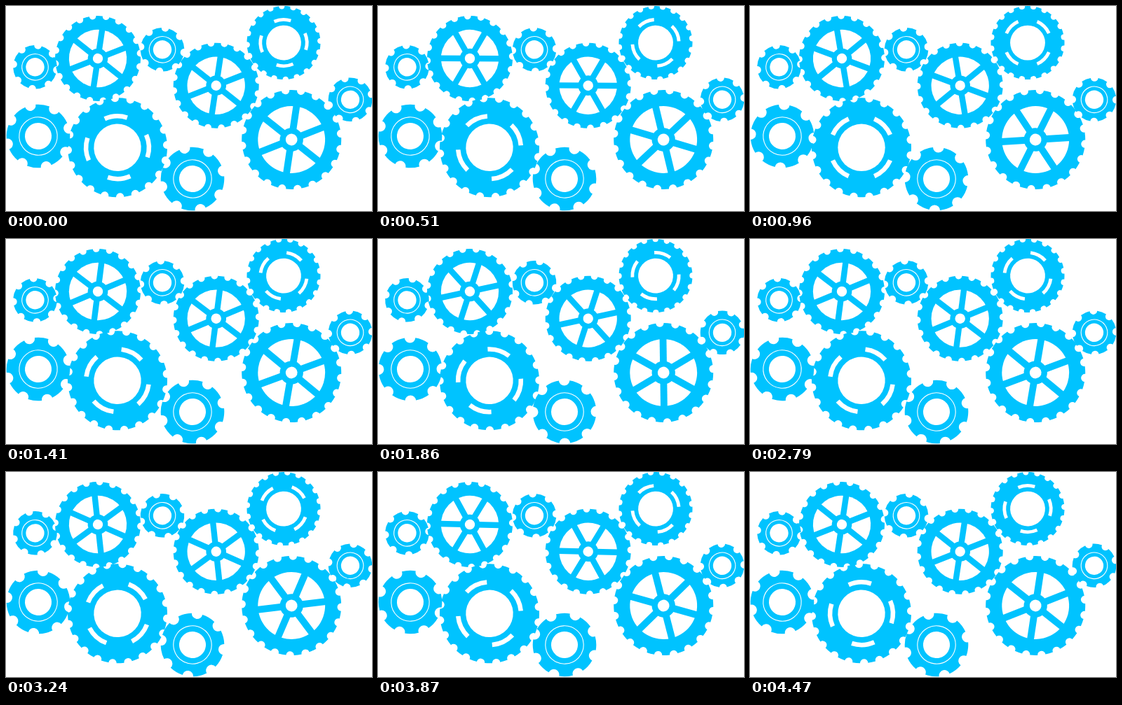
Write an HTML page that moves like this. It is 522 px wide and 293 px high and loops after 4.5 s.

```html
<!DOCTYPE html>
<html lang="en">
<head>
<meta charset="utf-8">
<title>Gears</title>
<style>
  html, body { margin: 0; width: 100%; height: 100%; overflow: hidden; background: #fff; }
  svg { display: block; width: 100vw; height: 100vh; }
</style>
</head>
<body>
<svg id="stage" viewBox="0 0 522 293"></svg>
<script>
const BLUE = '#00c3ff', WHITE = '#fff';
const LOOP = 4500, STEPS = 110, SWING = 70.6, TURN = 49.5;
const stage = document.getElementById('stage');

// kind, centre x, centre y, radius, turning ratio, angle at rest
const gears = [
  ['cog', 41.5, 87.3, 31.3, -2.5, 30],
  ['spoke', 131, 75, 61, 1, 8.5],
  ['cog', 223, 62.3, 31.3, -2.5, 30],
  ['spoke', 299.7, 113.7, 61, 1, 8.5],
  ['slot', 396, 52.6, 52.5, -1, -3],
  ['spoke', 407.2, 191, 71, -1, 8.5],
  ['cog', 491, 133.8, 31.3, 2.5, 8],
  ['cog', 46, 186, 45.3, 1.5, 8],
  ['slot', 159, 202.3, 71, -1, -3],
  ['cog', 266, 247, 45.3, 1.5, 8]
];

const point = (r, deg) => {
  const a = (deg - 90) * Math.PI / 180;
  return (r * Math.cos(a)).toFixed(2) + ' ' + (r * Math.sin(a)).toFixed(2);
};

const disc = (r, fill) => `<circle r="${r}" fill="${fill}"/>`;

// Disc with round bites centred on its rim; the first tooth is at `phase`.
function rim(r, teeth, bite, phase) {
  const pitch = 360 / teeth;
  const half = 2 * Math.asin(bite / 2 / r) * 180 / Math.PI;
  let d = '';
  for (let i = 0; i < teeth; i++) {
    const gap = phase + (i + 0.5) * pitch;
    d += (i ? 'L' : 'M') + point(r, gap - pitch + half)
      + `A${r} ${r} 0 0 1 ${point(r, gap - half)}`
      + `A${bite} ${bite} 0 0 0 ${point(r, gap + half)}`;
  }
  return `<path d="${d}Z" fill="${BLUE}"/>`;
}

const kinds = {
  cog: r => rim(r, 8, r * 0.172, 0)
    + `<circle r="${r * 0.6}" fill="none" stroke="${WHITE}" stroke-width="1.1"/>`
    + disc(r * 0.42, WHITE),

  spoke(r) {
    const reach = r * 0.69;
    let out = rim(r, 20, r * 0.08, -6.5) + disc(r * 0.675, WHITE);
    for (let i = 0; i < 3; i++) {
      out += `<path d="M${point(reach, i * 60)}L${point(reach, i * 60 + 180)}"`
        + ` stroke="${BLUE}" stroke-width="${r * 0.138}"/>`;
    }
    return out + disc(r * 0.235, BLUE) + disc(r * 0.118, WHITE);
  },

  slot(r) {
    const mid = r * 0.632;
    let out = rim(r, 20, r * 0.08, 9) + disc(r * 0.475, WHITE);
    for (let i = 0; i < 4; i++) {
      out += `<path d="M${point(mid, i * 90 - 21)}A${mid} ${mid} 0 0 1 ${point(mid, i * 90 + 21)}"`
        + ` fill="none" stroke="${WHITE}" stroke-width="${r * 0.092}"/>`;
    }
    return out;
  }
};

stage.innerHTML = gears.map(([kind, x, y, r]) =>
  `<g transform="translate(${x} ${y})"><g class="wheel">${kinds[kind](r)}</g></g>`).join('');
const wheels = [...stage.querySelectorAll('.wheel')];

const bezier = (a, b, s) => 3 * (1 - s) * (1 - s) * s * a + 3 * (1 - s) * s * s * b + s * s * s;

// Steady start, soft stop.
function ease(x) {
  let lo = 0, hi = 1;
  for (let i = 0; i < 24; i++) {
    const mid = (lo + hi) / 2;
    if (bezier(0.167, 0.667, mid) < x) lo = mid; else hi = mid;
  }
  return bezier(0.167, 1, lo);
}

function draw(time) {
  const step = Math.floor((time % LOOP) / LOOP * STEPS);
  const last = STEPS - 1;
  const u = step < TURN ? step / TURN : (last - step) / (last - TURN);
  const swing = SWING * ease(u);
  wheels.forEach((wheel, i) => {
    const [, , , , ratio, rest] = gears[i];
    wheel.setAttribute('transform', `rotate(${(rest + swing * ratio).toFixed(3)})`);
  });
}

const start = performance.now();
function tick() {
  draw(performance.now() - start);
  requestAnimationFrame(tick);
}
tick();
</script>
</body>
</html>
```
